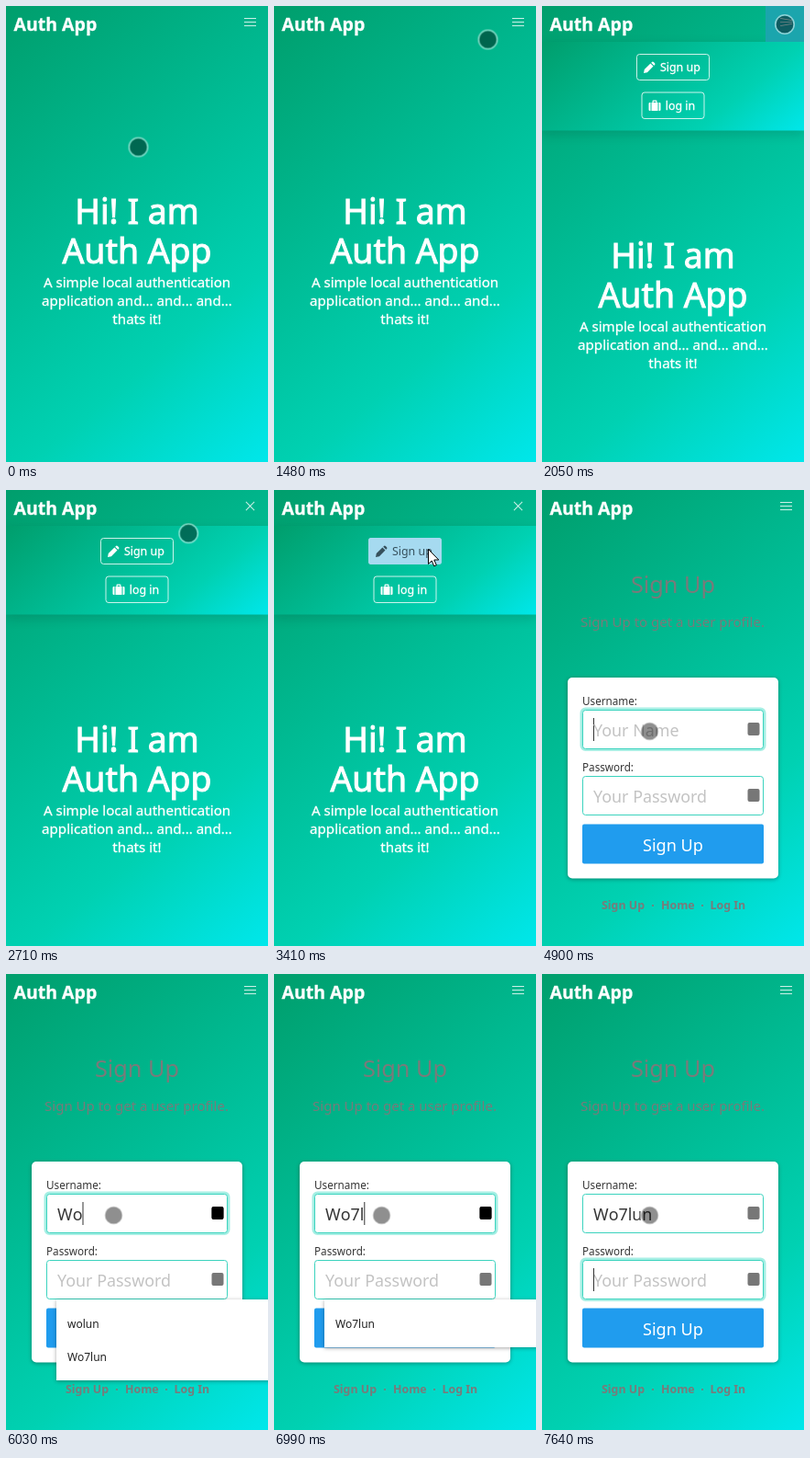
These frames come from a looping animation (286x496 px, 8000 ms). An HTML page:

```html
<!DOCTYPE html>
<html lang="en">
<head>
<meta charset="utf-8">
<title>Sign up flow</title>
<style>
html, body { margin: 0; width: 100%; height: 100%; overflow: hidden; background: #00d1b2; }
svg { display: block; font-family: "Noto Sans", "Open Sans", sans-serif; }
text { white-space: pre; }
.mid { text-anchor: middle; }
.bold { font-weight: 700; }
.white { fill: #fff; }
.grey { fill: #7a7a7a; }
/* Weights between regular and bold */
.firm { stroke: #fff; stroke-width: .3; }
.title { font-size: 37.4px; stroke: #fff; stroke-width: 1; }
.label { font-size: 11.7px; fill: #363636; }
.entry { font-size: 17.9px; fill: #363636; font-kerning: none; }
.hint { font-size: 17.9px; fill: #c3c3c3; }
.field { fill: #fff; stroke: #3bd3be; }
.glow { fill: none; stroke: #00d1b2; stroke-opacity: .35; stroke-width: 4; }
.caret { fill: #333; }
.outline { fill: none; stroke: #fff; stroke-opacity: .8; }
.line { fill: #fff; fill-opacity: .8; transform-box: fill-box; transform-origin: center; }
.sheet { fill: #fff; filter: drop-shadow(0 1px 2px rgba(0, 0, 0, .35)); }
.option { font-size: 12px; fill: #222; }

/* One 8 s clock: 1% is 80 ms */
[class*="a-"] { animation: 8s step-end -6ms infinite; }
.a-home { animation-name: home; }
.a-shift { animation-name: shift; }
.a-menu { animation-name: menu; }
.a-tap { animation-name: tap; }
.a-top { animation-name: top; }
.a-center { animation-name: center; }
.a-bottom { animation-name: bottom; }
.a-hover { animation-name: hover; }
.a-form { animation-name: form; }
.a-icons { animation-name: icons; }
.a-user { animation-name: user; }
.a-active { animation-name: active; }
.a-blink { animation-name: blink; }
.a-hint { animation-name: hint; }
.a-type { animation-name: type; }
.a-both { animation-name: both; }
.a-one { animation-name: one; }
.a-pass { animation-name: pass; }
.a-touch { animation-name: touch; }
.a-move { animation-name: move; }

@keyframes home { 0% { opacity: 1 } 44.125%, 100% { opacity: 0 } }
@keyframes shift { 0% { transform: none } 25.625%, 100% { transform: translateY(48px) } }
@keyframes menu { 0% { opacity: 0 } 25.625%, 100% { opacity: 1 } }
@keyframes tap { 0% { opacity: 0 } 23.875% { opacity: 1 } 27.125%, 100% { opacity: 0 } }
@keyframes top {
  0%, 44.125%, 100% { transform: none }
  25.625% { transform: translateY(1px) rotate(10deg) }
  27.125% { transform: translateY(4px) rotate(45deg) }
}
@keyframes center { 0%, 44.125%, 100% { opacity: 1 } 25.625% { opacity: .7 } 27.125% { opacity: 0 } }
@keyframes bottom {
  0%, 44.125%, 100% { transform: none }
  25.625% { transform: translateY(-1px) rotate(-10deg) }
  27.125% { transform: translateY(-4px) rotate(-45deg) }
}
@keyframes hover { 0% { opacity: 0 } 42.625% { opacity: 1 } 44.125%, 100% { opacity: 0 } }
@keyframes form { 0% { opacity: 0 } 44.125%, 100% { opacity: 1 } }
@keyframes icons { 0% { opacity: 0 } 50.875%, 100% { opacity: 1 } }
@keyframes user { 0% { opacity: 0 } 50.875% { opacity: 1 } 95.5%, 100% { opacity: 0 } }
@keyframes active { 0% { opacity: 0 } 62.75% { opacity: 1 } 95.5%, 100% { opacity: 0 } }
@keyframes blink {
  0%, 57.75%, 70.125%, 95.5%, 100% { opacity: 0 }
  50.875%, 61.25%, 73.625% { opacity: 1 }
}
@keyframes hint { 0% { opacity: 1 } 73.625%, 100% { opacity: 0 } }
@keyframes type {
  0% { transform: none }
  73.625% { transform: translateX(16.6px) }
  75.375% { transform: translateX(27.5px) }
  82.375% { transform: translateX(37.7px) }
  87.375% { transform: translateX(42.3px) }
  88.875% { transform: translateX(53.4px) }
  90.375%, 100% { transform: translateX(64.5px) }
}
@keyframes both { 0% { opacity: 0 } 73.625% { opacity: 1 } 82.375%, 100% { opacity: 0 } }
@keyframes one { 0% { opacity: 0 } 82.375% { opacity: 1 } 95.5%, 100% { opacity: 0 } }
@keyframes pass { 0% { opacity: 0 } 95.5%, 100% { opacity: 1 } }
@keyframes touch { 0%, 44.125%, 100% { opacity: 1 } 42.625% { opacity: 0 } }
@keyframes move {
  0% { transform: translate(144.5px, 153.5px) }
  6.25% { transform: translate(144.5px, 153.5px); animation-timing-function: steps(8, jump-start) }
  20.25% { transform: translate(233.5px, 36.5px) }
  20.375% { transform: translate(233.5px, 36.5px); animation-timing-function: steps(3, jump-start) }
  25.625% { transform: translate(265px, 20px) }
  28.875% { transform: translate(240px, 30px) }
  32% { transform: translate(209.5px, 41.5px) }
  33.875% { transform: translate(209.5px, 41.5px); animation-timing-function: steps(4, jump-start) }
  40.875% { transform: translate(168.5px, 64.5px) }
  45.875% { transform: translate(168.5px, 64.5px); animation-timing-function: steps(3, jump-start) }
  50.875% { transform: translate(149.5px, 161.5px); animation-timing-function: steps(3, jump-start) }
  55.875% { transform: translate(123.5px, 228px); animation-timing-function: steps(2, jump-start) }
  59.625%, 100% { transform: translate(117.5px, 262.5px) }
}
</style>
</head>
<body>
<svg width="286" height="496" viewBox="0 0 286 496">
  <defs>
    <linearGradient id="page" gradientUnits="userSpaceOnUse" x1="-34.9" y1="28.3" x2="320.9" y2="467.7">
      <stop offset="0" stop-color="#009e6c"/>
      <stop offset=".71" stop-color="#00d1b2"/>
      <stop offset="1" stop-color="#00e7eb"/>
    </linearGradient>
    <linearGradient id="panel" href="#page" x1="62.6" y1="-11.7" x2="223.4" y2="186.7"/>
    <path id="pencil" d="M0 12.5l.8-3.9 6.6-6.6 3.1 3.1-6.6 6.6zM8.2 1.2l.8-.8q.9-.7 1.8 0l1.3 1.3q.7.9 0 1.8l-.8.8z"/>
    <path id="case" d="M1.2 2.5H2v9H1.2Q0 11.5 0 10.3V3.7Q0 2.5 1.2 2.5zM11 2.5h.8Q13 2.5 13 3.7v6.6q0 1.2-1.2 1.2H11zM3 11.5v-9h1V1q0-1 1-1h3q1 0 1 1v1.5h1v9zM5.2 2.5h2.6V1.2H5.2z"/>
    <rect id="badge" x="224.5" width="13" height="14" rx="2"/>
  </defs>

  <rect width="286" height="496" fill="url(#page)"/>

  <g class="a-home">
    <g class="a-shift mid white">
      <g class="title">
        <text x="143" y="237">Hi! I am</text>
        <text x="143" y="280">Auth App</text>
      </g>
      <g class="firm" font-size="15.1">
        <text x="143" y="306">A simple local authentication</text>
        <text x="143" y="326">application and... and... and...</text>
        <text x="143" y="346">thats it!</text>
      </g>
    </g>
    <g class="a-menu">
      <rect y="39" width="286" height="96.5" fill="url(#panel)" style="filter: drop-shadow(0 4px 6px rgba(10, 10, 10, .14))"/>
      <rect class="outline" x="103.5" y="52.5" width="79" height="28" rx="3"/>
      <rect class="outline" x="109" y="94" width="68" height="28.5" rx="3"/>
      <g class="white" font-size="12.4">
        <use href="#pencil" x="111" y="60.5"/>
        <text class="firm" x="129" y="71">Sign up</text>
        <use href="#case" x="116.5" y="102.5"/>
        <text class="firm" x="134.7" y="113">log in</text>
      </g>
      <g class="a-hover" fill="#36505c" font-size="12.4">
        <rect x="103" y="52" width="80" height="29" rx="3" fill="#a6daf0"/>
        <use href="#pencil" x="111" y="60.5"/>
        <text x="129" y="71">Sign up</text>
      </g>
    </g>
    <rect class="a-tap" x="244" width="42" height="39" fill="#1ba5ad"/>
  </g>

  <text class="white bold firm" x="8.5" y="27" font-size="19.5">Auth App</text>
  <rect class="line a-top" x="260" y="13" width="13" height="1"/>
  <rect class="line a-center" x="260" y="17" width="13" height="1"/>
  <rect class="line a-bottom" x="260" y="21" width="13" height="1"/>

  <g class="a-form">
    <g class="grey mid">
      <text x="143" y="112" font-size="25.3">Sign Up</text>
      <text x="142.5" y="149" font-size="15">Sign Up to get a user profile.</text>
    </g>
    <rect class="sheet" x="28" y="204" width="230" height="218.5" rx="5"/>
    <text class="label" x="44" y="234">Username:</text>
    <text class="label" x="44" y="306">Password:</text>

    <rect class="glow a-user" x="43.5" y="238.5" width="199" height="43.5" rx="4"/>
    <rect class="field" x="44.5" y="239.5" width="197" height="42" rx="3"/>
    <text class="entry" x="56" y="268">Wo7lun</text>
    <g class="a-type">
      <rect class="white" x="56" y="248" width="76" height="26"/>
      <rect class="caret a-blink" x="56" y="248" width="1" height="25"/>
    </g>
    <text class="hint a-hint" x="56" y="268">Your Name</text>

    <rect class="glow a-pass" x="43.5" y="310.5" width="199" height="43.5" rx="4"/>
    <rect class="field" x="44.5" y="311.5" width="197" height="42" rx="3"/>
    <text class="hint" x="56" y="340">Your Password</text>
    <rect class="caret a-pass" x="56" y="320" width="1" height="25"/>

    <g class="a-icons" fill="#777">
      <use href="#badge" y="253"/>
      <use href="#badge" y="325"/>
    </g>
    <use class="a-active" href="#badge" y="253"/>

    <rect x="44" y="363.5" width="198" height="43" rx="2" fill="#209cee"/>
    <text class="white mid" x="143" y="392.5" font-size="18.1">Sign Up</text>

    <g class="grey bold" font-size="12.4">
      <text x="65" y="456">Sign Up</text>
      <text class="mid" x="121" y="456">·</text>
      <text x="130" y="456">Home</text>
      <text class="mid" x="175" y="456">·</text>
      <text x="183.5" y="456">Log In</text>
    </g>

    <g class="a-both">
      <rect class="sheet" x="55" y="354" width="240" height="88"/>
      <text class="option" x="67" y="385">wolun</text>
      <text class="option" x="67" y="421">Wo7lun</text>
    </g>
    <g class="a-one">
      <rect class="sheet" x="55" y="354" width="240" height="52"/>
      <text class="option" x="67" y="385">Wo7lun</text>
    </g>
  </g>

  <g class="a-touch">
    <g class="a-move">
      <circle r="9.5" fill="#000" fill-opacity=".44"/>
      <circle r="10.2" fill="none" stroke="#fff" stroke-opacity=".5" stroke-width="1.6"/>
    </g>
  </g>
  <path class="a-hover" d="M168.5 64.5v16l3.7-3.5 2.5 5.8 2.6-1.1-2.5-5.7h5z" fill="#fff" stroke="#000"/>
</svg>
</body>
</html>
```
